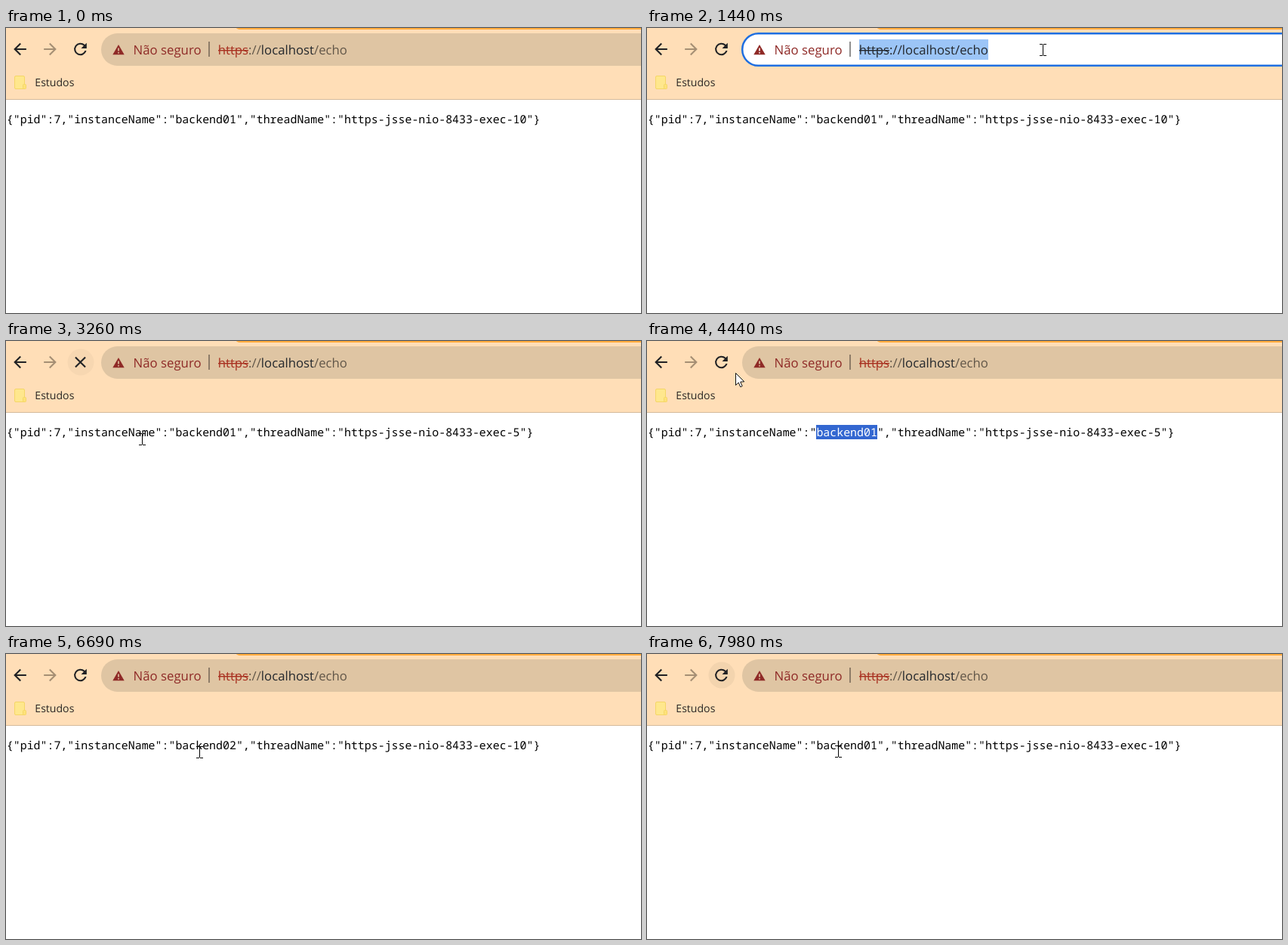
These frames come from a looping animation (841 by 377 pixels, 8000 ms). An HTML page with a canvas:

```html
<!DOCTYPE html>
<html lang="pt-BR">
<head>
<meta charset="utf-8">
<title>Echo</title>
<style>
  html, body { margin: 0; width: 841px; height: 377px; overflow: hidden; background: #fff; }
  canvas { display: block; }
</style>
</head>
<body>
<canvas id="stage" width="841" height="377"></canvas>
<script>
const ctx = document.getElementById('stage').getContext('2d', { alpha: false });
const LOOP = 8000;
const UI = '"Open Sans", "Noto Sans", sans-serif';
const MONO = '14.91px "Noto Sans Mono", "DejaVu Sans Mono", monospace';
const INK = '#202124', BASE = '#ffdeb7', PILL = '#dfc5a3', WARN = '#8f2a27';

const ICON = {
  back: new Path2D('M20 11H7.83l5.59-5.59L12 4l-8 8 8 8 1.41-1.41L7.83 13H20z'),
  reload: new Path2D('M17.65 6.35A8 8 0 1 0 19.73 14h-2.08A6 6 0 1 1 16.22 7.78L13 11h7V4z'),
  stop: new Path2D('M19 6.41 17.59 5 12 10.59 6.41 5 5 6.41 10.59 12 5 17.59 6.41 19 12 13.41 17.59 19 19 17.59 13.41 12z')
};

// Places the pointer visits
const ENTRY = { x: 752, y: 370 }, URL_BAR = { x: 524, y: 30 }, RELOAD = { x: 103, y: 23 };
const LINE = { x: 180, y: 131 }, NAME = { x: 256, y: 131 }, BESIDE = { x: 117, y: 42 };
const MOVES = [
  { from: 170, to: 1300, goal: URL_BAR },
  { from: 1790, to: 2400, goal: RELOAD },
  { from: 2760, to: 3260, goal: LINE },
  { from: 3330, to: 3600, goal: NAME },
  { from: 3900, to: 4440, goal: BESIDE },
  { from: 4500, to: 4760, goal: RELOAD },
  { from: 5780, to: 6400, goal: NAME },
  { from: 6760, to: 7380, goal: RELOAD },
  { from: 7600, to: 7970, goal: { x: 253, y: 130 } }
];

const FOCUS = 1360, SELECT = 3670;
// click: icon turns to stop, show: new answer, done: icon turns back
const RELOADS = [
  { click: 2540, show: 2760, done: 3400, name: 'backend01', worker: 5 },
  { click: 4920, show: 5060, done: 5850, name: 'backend02', worker: 10 },
  { click: 7520, show: 7590, done: 7900, name: 'backend01', worker: 10 }
];

const within = (t, a, b) => t >= a && t < b;
const ease = p => (1 - Math.cos(Math.PI * p)) / 2;

function pointerAt(t) {
  let { x, y } = ENTRY;
  for (const { from, to, goal } of MOVES) {
    const p = ease(Math.min(1, Math.max(0, (t - from) / (to - from))));
    x += (goal.x - x) * p;
    y += (goal.y - y) * p;
  }
  return { x, y };
}

// The highlight appears at once and fades after the pointer leaves
function glowAt(t) {
  const fade = 550;
  for (let lag = 0; lag < fade && lag <= t; lag += 10) {
    const { x, y } = pointerAt(t - lag);
    if (Math.hypot(x - 99, y - 28) < 17.5) return .11 * (1 - lag / fade);
  }
  return 0;
}

function rect(x, y, w, h, color) {
  ctx.fillStyle = color;
  ctx.fillRect(x, y, w, h);
}

function shape(points, fill, stroke) {
  ctx.beginPath();
  points.forEach(([x, y]) => ctx.lineTo(x, y));
  ctx.closePath();
  ctx.fillStyle = fill;
  ctx.fill();
  if (stroke) {
    ctx.lineWidth = 1;
    ctx.strokeStyle = stroke;
    ctx.stroke();
  }
}

function box(x, y, w, h, r, fill, stroke, width = 1) {
  ctx.beginPath();
  ctx.roundRect(x, y, w, h, r);
  ctx.fillStyle = fill;
  ctx.fill();
  if (stroke) {
    ctx.lineWidth = width;
    ctx.strokeStyle = stroke;
    ctx.stroke();
  }
}

function text(str, x, y, font, color) {
  ctx.font = font;
  ctx.fillStyle = color;
  ctx.fillText(str, x, y);
  return x + ctx.measureText(str).width;
}

function icon(path, cx, color, flip = 1) {
  const size = 25 / 24;
  ctx.save();
  ctx.translate(cx, 28);
  ctx.scale(size * flip, size);
  ctx.translate(-12, -12);
  ctx.fillStyle = color;
  ctx.fill(path);
  ctx.restore();
}

function addressBar(focused) {
  const bg = focused ? '#fff' : PILL;
  if (focused) box(126.2, 7.2, 800, 42.6, 21.3, bg, '#1f6fe0', 2.5);
  else box(126, 7, 800, 43, 21.5, bg);

  shape([[149, 22], [156.7, 35.3], [141.3, 35.3]], WARN);
  rect(148.2, 26.5, 1.6, 4, bg);
  rect(148.2, 32, 1.6, 1.6, bg);
  text('Não seguro', 168.5, 35, '16.8px ' + UI, WARN);
  rect(268, 18, 2, 20, focused ? '#909090' : '#8d7c68');

  if (focused) rect(281, 15, 171, 27, '#9cc5f7');
  const dark = '#24282d', soft = focused ? dark : '#625749';
  const red = focused ? dark : '#a83020';
  const font = '16.75px ' + UI;
  const end = text('https', 280.7, 35, font, red);
  rect(281, 29, end - 281, 1.4, red);
  let x = text('://', end, 35, font, soft);
  x = text('localhost', x, 35, font, dark);
  text('/echo', x, 35, font, soft);
}

function chrome(t) {
  rect(0, 0, 841, 94, BASE);
  rect(0, 94, 841, 1, '#d4bb9c');
  box(304, -8, 560, 10, 8, '#ffab3d');

  box(81.5, 10.5, 35, 35, 17.5, `rgba(0,0,0,${glowAt(t)})`);
  icon(ICON.back, 18.5, INK);
  icon(ICON.back, 58.5, '#a58f74', -1);
  const loading = RELOADS.some(r => within(t, r.click, r.done));
  icon(loading ? ICON.stop : ICON.reload, 98.5, INK);

  addressBar(within(t, FOCUS, RELOADS[0].click));
  box(11.5, 63.5, 13, 17, 1.5, '#ffe78d', '#f5d667');
  box(22.5, 74.5, 4, 6, 1, '#ffe27a', '#f5d667');
  text('Estudos', 38.3, 77, '14.1px ' + UI, '#2b2825');
}

function page(t) {
  const first = { name: 'backend01', worker: 10 };
  const { name, worker } = RELOADS.findLast(r => t >= r.show) || first;
  const selected = within(t, SELECT, RELOADS[1].show);
  if (selected) rect(224, 111, 81, 19, '#3367d1');
  let x = text('{"pid":7,"instanceName":"', .8, 126, MONO, '#000');
  x = text(name, x, 126, MONO, selected ? '#fff' : '#000');
  text(`","threadName":"https-jsse-nio-8433-exec-${worker}"}`, x, 126, MONO, '#000');
}

function beam() {
  for (const y of [-9, 6]) {
    rect(-4, y, 4, 1, '#000');
    rect(1, y, 4, 1, '#000');
  }
  rect(0, -8, 1, 14, '#000');
}

function arrow() {
  ctx.translate(.5, .5);
  shape([[0, 0], [0, 16], [3.7, 12.5], [6.3, 18.3], [8.7, 17.2], [6.2, 11.6], [11.3, 11.3]], '#fff', '#111');
}

function pointer(t) {
  if (t < MOVES[0].from) return;
  const { x, y } = pointerAt(t);
  const overUrl = x > 135 && y > 8 && y < 50;
  const overText = x < 707 && y > 112 && y < 137;
  ctx.save();
  ctx.translate(Math.round(x), Math.round(y));
  overUrl || overText ? beam() : arrow();
  ctx.restore();
}

function draw() {
  const t = performance.now() % LOOP;
  ctx.textRendering = 'geometricPrecision';
  rect(0, 0, 841, 377, '#fff');
  chrome(t);
  page(t);
  pointer(t);
  requestAnimationFrame(draw);
}
draw();
</script>
</body>
</html>
```
